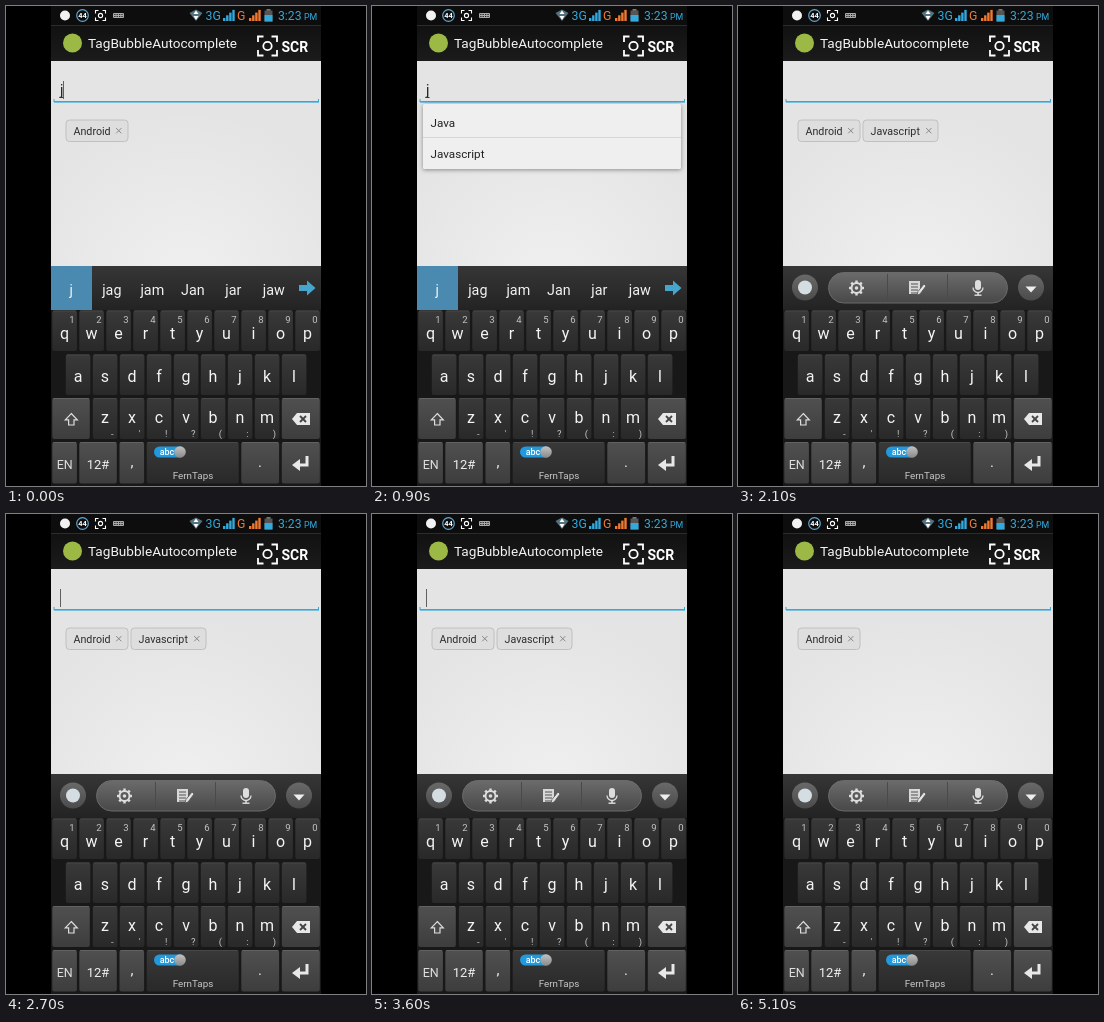
Recreate the animation shown at these times as an HTML page with a canvas. Size 360x480 px, loop 5200 ms.

```html
<!DOCTYPE html>
<html lang="en">
<head>
<meta charset="utf-8">
<title>Tag input demo</title>
<style>
html, body { margin: 0; width: 100%; height: 100%; overflow: hidden; background: #000; }
canvas { display: block; }
</style>
</head>
<body>
<canvas id="stage" width="360" height="480"></canvas>
<script>
const ctx = document.getElementById('stage').getContext('2d');
const LOOP = 5200;
const DROPDOWN_AT = 300, PICK_AT = 1300, TOOLBAR_AT = 1900, REMOVE_AT = 4000;
const BLUE = '#33a9dc', ORANGE = '#f07a32';

function text(str, x, y, size, color = '#eee', align = 'left', weight = 400) {
  ctx.font = `${weight} ${size}px Roboto, sans-serif`;
  ctx.textAlign = align;
  ctx.fillStyle = color;
  ctx.fillText(str, x, y);
}
function rect(x, y, w, h, fill) {
  ctx.fillStyle = fill;
  ctx.fillRect(x, y, w, h);
}
function round(x, y, w, h, r, fill, stroke) {
  ctx.beginPath();
  ctx.roundRect(x, y, w, h, r);
  paint(fill, stroke);
}
function circle(x, y, r, fill, stroke, width) {
  ctx.beginPath();
  ctx.arc(x, y, r, 0, 7);
  paint(fill, stroke, width);
}
function poly(points, fill, stroke, width) {
  ctx.beginPath();
  points.forEach(([x, y]) => ctx.lineTo(x, y));
  if (fill) ctx.closePath();
  paint(fill, stroke, width);
}
function paint(fill, stroke, width = 1) {
  if (fill) { ctx.fillStyle = fill; ctx.fill(); }
  if (stroke) { ctx.strokeStyle = stroke; ctx.lineWidth = width; ctx.stroke(); }
}
function vertical(y0, y1, top, bottom) {
  const g = ctx.createLinearGradient(0, y0, 0, y1);
  g.addColorStop(0, top);
  g.addColorStop(1, bottom);
  return g;
}

// Corner brackets around a ring
function captureIcon(x, y, half, arm, ring, width) {
  for (const sx of [-1, 1]) for (const sy of [-1, 1]) {
    const cx = x + sx * half, cy = y + sy * half;
    poly([[cx - sx * arm, cy], [cx, cy], [cx, cy - sy * arm]], null, '#fff', width);
  }
  circle(x, y, ring, null, '#fff', width);
}
function signal(x, color) {
  for (let i = 0; i < 4; i++) rect(x + i * 3.1, 12 - i * 2.7, 2.4, 3 + i * 2.7, color);
}

function statusBar() {
  rect(45, 0, 270, 19, '#0d0d0d');
  circle(59, 9.5, 5, '#f2f2f2');
  circle(76.5, 9.5, 5.8, null, '#5ba9d6', 1.2);
  text('44', 76.5, 12.2, 7.5, '#fff', 'center', 700);
  captureIcon(94.5, 9.5, 5, 3, 2.1, 1.1);
  round(107, 7, 11, 5, 1, '#aaa');
  for (let i = 0; i < 4; i++) for (let j = 0; j < 2; j++) rect(108.2 + i * 2.4, 8 + j * 2, 1.3, 1, '#222');
  poly([[183.5, 7], [190, 3.5], [196.5, 7], [190, 15]], '#56717e');
  poly([[187.5, 8], [190, 4.5], [192.5, 8]], '#fff');
  poly([[187.5, 10], [190, 14], [192.5, 10]], '#fff');
  text('3G', 199.5, 14, 12.3, BLUE);
  signal(217, BLUE);
  text('G', 231, 14, 12.3, ORANGE);
  signal(243, ORANGE);
  rect(260.5, 3, 4, 2, '#777');
  rect(258.5, 4.5, 8, 11, '#555');
  rect(258.5, 9, 8, 6.5, BLUE);
  text('3:23', 272, 14, 12.2, BLUE);
  text('PM', 298, 14, 8.8, BLUE);
}

function actionBar() {
  rect(45, 19, 270, 36, vertical(19, 55, '#111', '#1b1b1b'));
  rect(45, 19, 270, 1, '#2c2c2c');
  circle(66.5, 37, 9.5, '#9bb944');
  text('TagBubbleAutocomplete', 82, 42, 13.6, '#f3f3f3');
  captureIcon(261.5, 40, 9.5, 5.5, 4.2, 1.8);
  text('SCR', 275.5, 46, 14, '#fff', 'left', 700);
}

function page() {
  const glow = ctx.createRadialGradient(180, 275, 10, 180, 275, 170);
  glow.addColorStop(0, '#efefef');
  glow.addColorStop(1, '#e4e4e4');
  rect(45, 55, 270, 205, glow);
}

function field(t) {
  rect(48, 95, 265, 1.6, BLUE);
  rect(47.5, 93, 1, 3, BLUE);
  rect(312, 93, 1, 3, BLUE);
  const typed = t < PICK_AT;
  if (typed) {
    text('j', 54, 89, 14.5, '#222');
    rect(53.5, 91, 4, 1, '#333');
  }
  const blinkStart = typed ? 0 : PICK_AT;
  if ((t - blinkStart) % 1000 < 500) rect(typed ? 57 : 54, 75, 1, 18, '#606060');
}

function chip(label, x, w) {
  round(x + .5, 114, w, 21.5, 3.5, '#dedede', '#c0c0c0');
  text(label, x + 8, 129, 10.7, '#2c2c2c');
  const cx = x + w - 8.7, cy = 124.7, d = 2.6;
  poly([[cx - d, cy - d], [cx + d, cy + d]], null, '#888', 1);
  poly([[cx - d, cy + d], [cx + d, cy - d]], null, '#888', 1);
}

function dropdown() {
  ctx.save();
  ctx.shadowColor = 'rgba(0,0,0,.4)';
  ctx.shadowBlur = 4;
  ctx.shadowOffsetY = 1;
  round(51, 98, 258, 65, 1.5, '#efefef');
  ctx.restore();
  rect(51, 131, 258, 1, '#d6d6d6');
  text('Java', 58.5, 120.7, 11.7, '#222');
  text('Javascript', 58.5, 152, 11.7, '#222');
}

function suggestions() {
  rect(45, 260, 41, 44, '#4b8ab0');
  ['j', 'jag', 'jam', 'Jan', 'jar', 'jaw'].forEach((word, i) =>
    text(word, 65.3 + i * 40.5, 289, 14.3, '#f2f2f2', 'center'));
  poly([[293, 279], [301, 279], [301, 274.5], [309.5, 282], [301, 289.5], [301, 285], [293, 285]], '#45a5cd');
}

function toolbar() {
  const metal = vertical(266, 297, '#6c6c6c', '#484848');
  circle(67, 281.5, 13, metal);
  circle(67, 281.5, 7, '#d4dde2');
  round(90.5, 266.5, 179, 30.5, 15.2, metal, '#6a6a6a');
  for (const x of [149, 209]) rect(x, 268, 1, 27, '#4a4a4a');

  for (let i = 0; i < 8; i++) {
    const c = Math.cos(i * Math.PI / 4), s = Math.sin(i * Math.PI / 4);
    poly([[118.5 + c * 5, 282 + s * 5], [118.5 + c * 7.5, 282 + s * 7.5]], null, '#ddd', 2.4);
  }
  circle(118.5, 282, 5, null, '#ddd', 2);
  circle(118.5, 282, 1.8, '#ddd');

  rect(171, 275, 11, 13, '#d8d8d8');
  for (let y = 277.5; y < 287; y += 3) rect(173, y, 7, 1, '#555');
  poly([[179, 289], [180, 285.5], [186, 278], [188, 280], [182, 288]], '#e4e4e4', '#555', .8);

  round(237, 274, 6, 10, 3, '#ddd');
  ctx.beginPath();
  ctx.arc(240, 281.5, 5, 0, Math.PI);
  paint(null, '#ddd', 1.3);
  rect(239.3, 286, 1.5, 3, '#ddd');
  rect(236.5, 288.5, 7, 1.4, '#ddd');

  circle(293, 281.5, 13, metal);
  poly([[287.5, 280.5], [298.5, 280.5], [293, 286.5]], '#eee');
}

function key(x, y, w, h, light) {
  const [top, bottom] = light ? ['#505050', '#3d3d3d'] : ['#393939', '#292929'];
  round(x, y, w, h, 2, vertical(y, y + h, top, bottom));
  rect(x + 1, y, w - 2, 1, light ? '#626262' : '#484848');
}
function letters(row, firstX, y, h, baseline, hints = '', hintY = 0) {
  [...row].forEach((letter, i) => {
    const x = firstX + i * 27;
    key(x - 12.2, y, 24.6, h);
    text(letter, x, baseline, 16, '#f4f4f4', 'center');
    if (hints) text(hints[i], x + 7.3, hintY, 9.5, '#c4c4c4', 'center');
  });
}

function keyboard(t) {
  rect(45, 260, 270, 220, '#181818');
  rect(45, 260, 270, 44, vertical(260, 304, '#363636', '#232323'));
  if (t < TOOLBAR_AT) suggestions(); else toolbar();

  letters('qwertyuiop', 58.5, 304.5, 40.5, 333, '1234567890', 317);
  letters('asdfghjkl', 72, 348.5, 40.5, 375.5);
  letters('zxcvbnm', 99, 392, 41, 417, "-'!?(:)", 430.5);
  key(46.3, 392, 37.5, 41, true);
  key(275.8, 392, 38, 41, true);
  key(46.3, 436, 24.6, 41.5, true);
  key(73.3, 436, 37.5, 41.5, true);
  key(113.5, 436, 24.6, 41.5, true);
  key(140.7, 436, 92, 41.5);
  key(235.3, 436, 37.8, 41.5, true);
  key(275.8, 436, 38, 41.5, true);

  poly([[65.3, 407.5], [71.3, 413.8], [68, 413.8], [68, 419], [62.6, 419], [62.6, 413.8], [59.3, 413.8]], '#4a4a4a', '#ddd', 1.2);
  poly([[286, 413], [291, 407], [304, 407], [304, 419], [291, 419]], '#e8e8e8');
  poly([[294, 410], [300, 416]], null, '#444', 1.8);
  poly([[294, 416], [300, 410]], null, '#444', 1.8);
  text('EN', 58.7, 462.5, 12.5, '#ddd', 'center');
  text('12#', 92, 462.5, 13, '#eee', 'center');
  text(',', 126, 461, 15, '#eee', 'center');
  text('.', 254, 461, 15, '#eee', 'center');
  poly([[301, 450], [301, 459], [293, 459]], null, '#e8e8e8', 3);
  poly([[286, 459], [294, 453], [294, 465]], '#e8e8e8');

  round(148, 440.5, 31, 11, 5.5, '#2199dc');
  text('abc', 161, 449, 9, '#fff', 'center', 500);
  circle(174, 446, 5.8, vertical(440, 452, '#c4c4c4', '#888'));
  text('FernTaps', 187, 473, 9.8, '#c8c8c8', 'center');
}

function draw(t) {
  rect(0, 0, 360, 480, '#000');
  statusBar();
  actionBar();
  page();
  field(t);
  chip('Android', 59.5, 62);
  if (t >= PICK_AT && t < REMOVE_AT) chip('Javascript', 124.5, 75);
  if (t >= DROPDOWN_AT && t < PICK_AT) dropdown();
  keyboard(t);
}

const start = performance.now();
function frame() {
  draw((performance.now() - start) % LOOP);
  requestAnimationFrame(frame);
}
frame();
</script>
</body>
</html>
```
